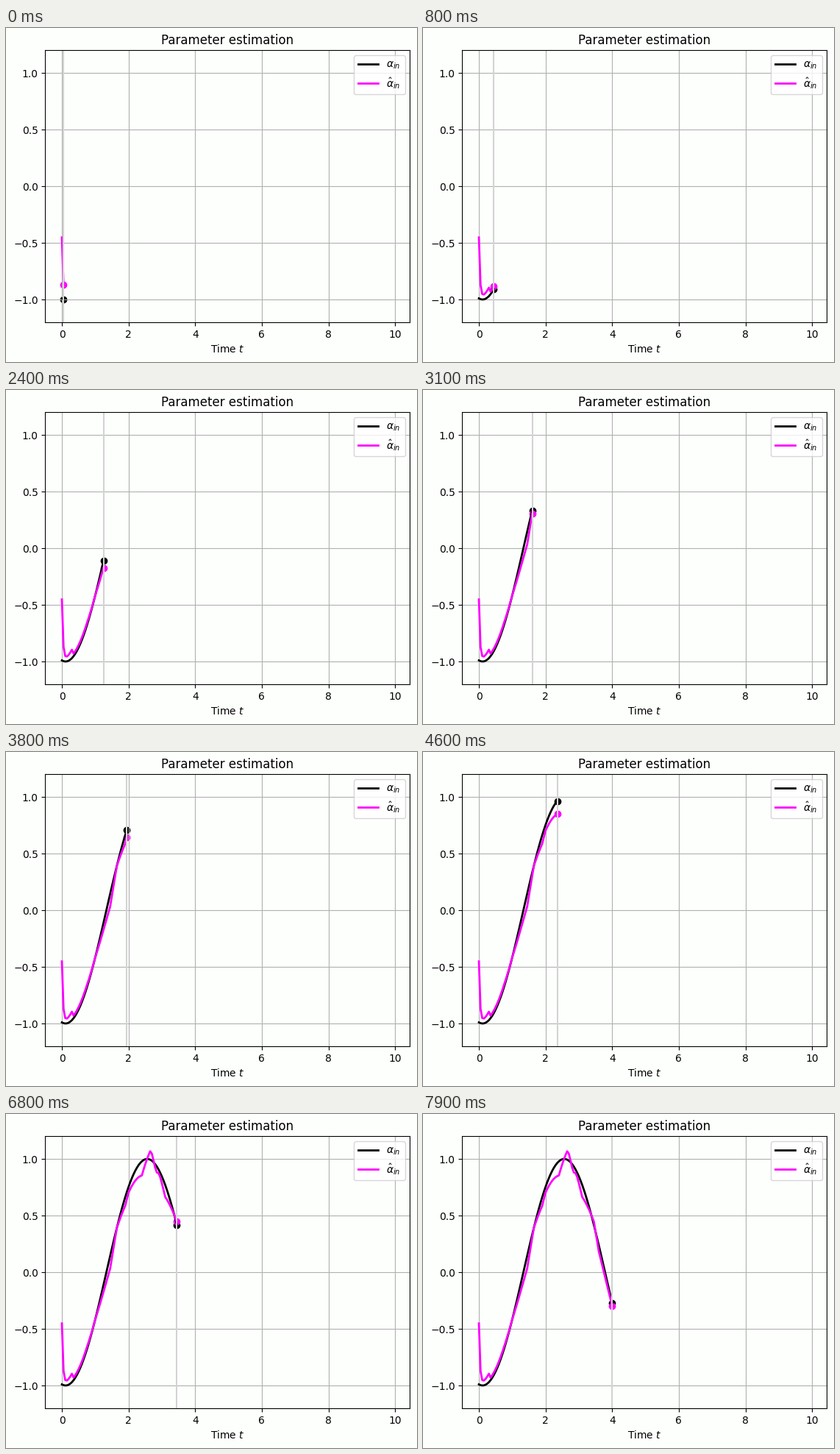
A matplotlib script that plays this animation: 559x454 px, repeating every 8 s.

```python
import numpy as np
import matplotlib.pyplot as plt
from matplotlib.animation import FuncAnimation

W, H, DPI = 559, 454, 100
FRAMES, INTERVAL = 80, 100
DT = 0.05
PAPER = "#fdfffd"

# (time, error) where the estimate's drift turns around
DRIFT = [(0, 0), (.3, .075), (.35, .023), (.75, .02), (1, 0), (1.45, -.113),
         (1.65, 0), (1.9, -.076), (2, -.05), (2.4, -.125), (2.67, .09),
         (2.83, -.06), (2.92, -.025), (3.1, -.106), (3.45, .03),
         (3.6, -.055), (4, -.025)]

t = np.arange(FRAMES + 1) * DT
alpha = np.sin(1.282 * t - 1.7125)
startup = 0.538 * np.exp(-t / 0.032)
estimate = alpha + startup + np.interp(t, *zip(*DRIFT))

fig = plt.figure(figsize=(W / DPI, H / DPI), dpi=DPI, facecolor=PAPER)
ax = fig.add_axes([53.47 / W, 54.15 / H, 496 / W, 369.6 / H], facecolor=PAPER)
ax.set(xlim=(-0.4975, 10.4475), ylim=(-1.2, 1.2),
       xlabel="Time $t$", title="Parameter estimation")
ax.grid(True)


def trace(color, label):
    dot = ax.scatter([], [], color=color)
    line, = ax.plot([], [], color=color, lw=2, label=label)
    return line, dot


tracks = [
    (alpha, *trace("black", r"$\alpha_{in}$")),
    (estimate, *trace("magenta", r"$\hat{\alpha}_{in}$")),
]
cursor = ax.axvline(0, color="lightgray", lw=1.5)
ax.legend(loc="upper right")


def update(frame):
    n = frame + 1
    for values, line, dot in tracks:
        line.set_data(t[:n + 1], values[:n + 1])
        dot.set_offsets([[t[n], values[n]]])
    cursor.set_xdata([t[n], t[n]])
    return [cursor]


anim = FuncAnimation(fig, update, frames=FRAMES, interval=INTERVAL,
                     repeat=True, repeat_delay=0, blit=False)
plt.show()
```
